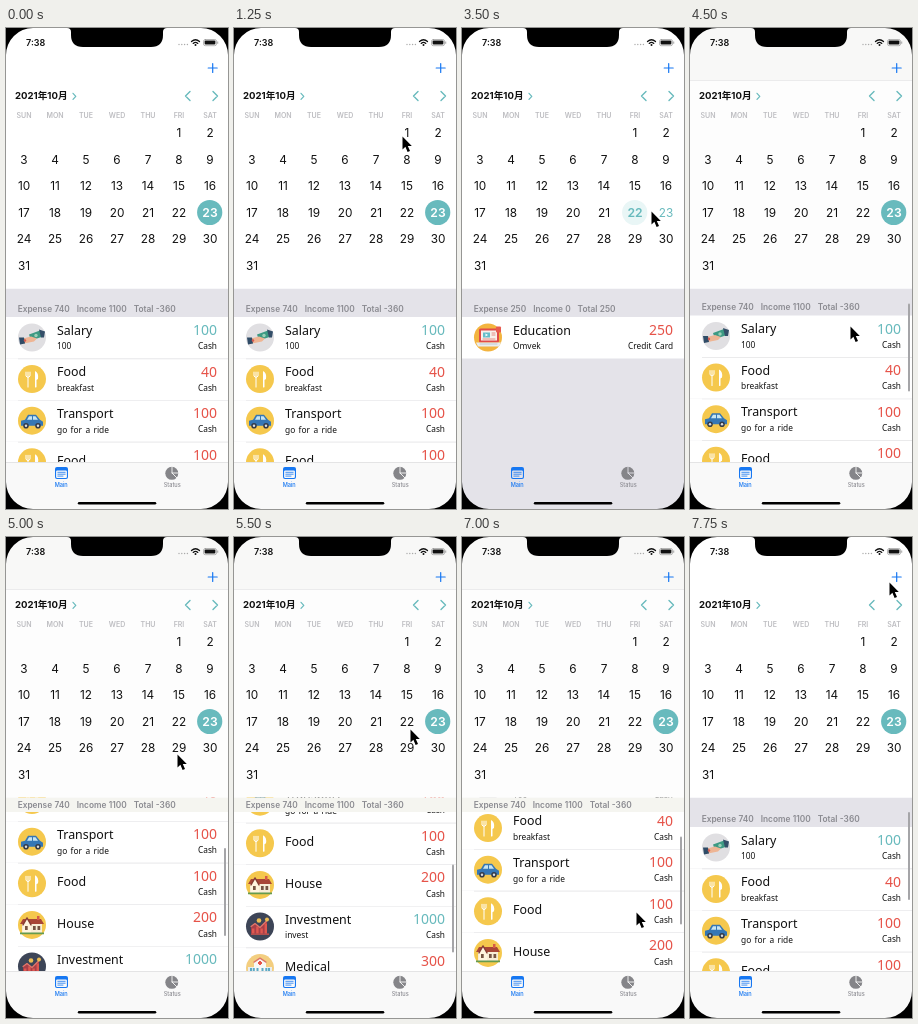
Animation, 222 px wide and 481 px high, one loop 8 s. Source, as an HTML page with a canvas:

```html
<!DOCTYPE html>
<html lang="en">
<head>
<meta charset="utf-8">
<title>Expense calendar</title>
<style>
  html, body { margin: 0; width: 100%; height: 100%; overflow: hidden; background: #fff; }
  canvas { display: block; width: 222px; height: 481px; }
</style>
</head>
<body>
<canvas id="stage"></canvas>
<script>
const W = 222, H = 481, LOOP = 8000, STEP = 250;
const UI = 'Inter, "Noto Sans CJK JP", "Noto Sans CJK", sans-serif';
const BODY = '"Noto Sans", sans-serif';
const TEAL = '#68babd', RED = '#e65349', BLUE = '#1677f2', GRAY = '#e4e3e9', MUTED = '#8b8b91';
const LIST_TOP = 260.5, ROWS_TOP = 289, ROW_H = 41.6, TAB_TOP = 434;

const canvas = document.getElementById('stage');
const ctx = canvas.getContext('2d');
const ratio = window.devicePixelRatio || 1;
canvas.width = W * ratio;
canvas.height = H * ratio;

function box(x, y, w, h, color, radius = 0) {
  ctx.fillStyle = color;
  ctx.beginPath();
  ctx.roundRect(x, y, w, h, radius);
  ctx.fill();
}
function disc(x, y, r, color) {
  ctx.fillStyle = color;
  ctx.beginPath();
  ctx.arc(x, y, r, 0, Math.PI * 2);
  ctx.fill();
}
function shape(path, color) {
  ctx.fillStyle = color;
  ctx.fill(new Path2D(path));
}
function stroke(path, color, width = 1) {
  ctx.strokeStyle = color;
  ctx.lineWidth = width;
  ctx.lineCap = ctx.lineJoin = 'round';
  ctx.stroke(new Path2D(path));
}
// y is the middle of the capital letters
function text(str, x, y, size, color, { weight = 400, font = UI, align = 'left', words = 0 } = {}) {
  ctx.font = `${weight} ${size}px ${font}`;
  ctx.textAlign = align;
  ctx.wordSpacing = words + 'px';
  ctx.fillStyle = color;
  ctx.fillText(str, x, y + size * 0.36);
}
function at(x, y, draw) {
  ctx.save();
  ctx.translate(x, y);
  draw();
  ctx.restore();
}

const icons = {
  salary() {
    disc(0, 0, 14, '#e0dfe2');
    shape('M-3 -3 L8 -7 L11 -1 L-1 3 Z', '#3d9a83');
    disc(4, -2, 1.7, '#9bd0b8');
    shape('M-9 1 L-1 -1 L5 1 L2 4 L-8 6 Z', '#eeb594');
    shape('M-13 0 L-8 0 L-7 6 L-12 7 Z', '#304c67');
    shape('M7 -8 L13 -6 L12 0 L9 0 Z', '#344f69');
    disc(-7, 3, 1.2, '#d65a50');
  },
  food() {
    disc(0, 0, 14, '#f5c84d');
    stroke('M-4 -1 V8 M-6 -7 V-3 Q-4 0 -2 -3 V-7 M-4 -7 V-2', '#fff', 1);
    shape('M3 -8 Q7 -6 6 0 L4.5 1 V8 Q3.5 9 3 8 Z', '#fff');
  },
  transport() {
    disc(0, 0, 14, '#f5c84d');
    shape('M-11 0 L-7 -1 L-4 -6 H4 L8 -1 L11 1 V5 H-11 Z', '#3577b5');
    shape('M-5 -1 L-3 -4.5 H0 V-1 Z M1 -1 V-4.5 H3.5 L6 -1 Z', '#c7e5f2');
    for (const x of [-6, 6]) { disc(x, 5, 2.8, '#343c4a'); disc(x, 5, 1.2, '#d9dde0'); }
  },
  house() {
    disc(0, 0, 14, '#f5c84d');
    box(-10, -2, 20, 10, '#f8edd6');
    shape('M-12 -1 L-9 -6 H9 L12 -1 Z', '#a94637');
    shape('M-9 0 L-5 -7 L-1 0 V8 H-9 Z', '#fff5df');
    stroke('M-9 0 L-5 -7 L-1 0', '#873e35', 1.4);
    box(5, -9, 2.5, 4, '#d65b48');
    for (const x of [-7, 1, 5.5]) box(x, 1, 2.7, 4, '#765544');
    box(-12, 7.5, 24, 1.8, '#659b4f');
  },
  investment() {
    disc(0, 0, 14, '#3d4557');
    shape('M-9 7 V0 L-5 -3 L0 1 L7 -6 V7 Z', '#a83f48');
    [5, 7, 5, 10].forEach((h, i) => box(-8 + i * 4.2, 7 - h, 2.4, h, '#df5850'));
    stroke('M-9 0 L-5 -3 L0 1 L7 -6', '#e3786a', 1.2);
    disc(-1, -6, 2.3, '#edbd54');
    disc(7, -7, 2, '#edbd54');
    box(-9, 7, 18, 1.3, '#d8534d');
  },
  medical() {
    disc(0, 0, 14, '#f3ce80');
    box(-12, -1, 24, 9, '#e9eef0');
    shape('M-6 -6 L0 -10 L6 -6 V8 H-6 Z', '#f7f7f5');
    stroke('M-6 -6 L0 -10 L6 -6', '#dc7568', 1.3);
    shape('M-1 -7 H1 V-6 H2 V-4 H1 V-3 H-1 V-4 H-2 V-6 H-1 Z', RED);
    for (const x of [-10, -7.2, -3.5, 1.5, 5.3, 8]) box(x, 0, 2, 3, '#5daac5');
    box(-12, 4.3, 24, 1.3, '#dd7468');
    box(-2, 4, 4, 5, '#4f91b0');
    box(-11.5, 7.8, 23, 1.8, '#65b5cb');
  },
  education() {
    disc(0, 0, 14, '#f3b43f');
    box(-9, -9, 20, 14, '#e24b48', 1.5);
    box(-7, -7, 16, 10, '#f8efeb');
    box(-5, -5, 7, 5, '#65bdca');
    shape('M-2.5 -4 L0 -2.5 L-2.5 -1 Z', '#fff');
    stroke('M4 -4.5 H7 M4 -2.5 H7 M-5 1.5 H7', '#df756e', 0.8);
    shape('M-12 5 H13 L11 9 H-10 Z', '#e9edf0');
    stroke('M-8 6.5 H9', '#b7c0c7', 0.8);
    box(8, -11, 5, 6, '#e75a4e', 1);
  }
};

const entry = (icon, title, note, amount, pay = 'Cash', color = RED) => ({ icon, title, note, amount, pay, color });
const days = {
  23: {
    summary: 'Expense 740   Income 1100   Total -360',
    rows: [
      entry('salary', 'Salary', '100', '100', 'Cash', TEAL),
      entry('food', 'Food', 'breakfast', '40'),
      entry('transport', 'Transport', 'go for a ride', '100'),
      entry('food', 'Food', '', '100'),
      entry('house', 'House', '', '200'),
      entry('investment', 'Investment', 'invest', '1000', 'Cash', TEAL),
      entry('medical', 'Medical', '', '300')
    ]
  },
  22: {
    summary: 'Expense 250   Income 0   Total 250',
    rows: [entry('education', 'Education', 'Omvek', '250', 'Credit Card')]
  }
};

// Each key: time, then values
const pointerKeys = [
  [1000, 184, 82], [1250, 168, 108], [1500, 152, 150], [1750, 162, 178], [2000, 170, 188],
  [2750, 171, 188], [3250, 184, 184], [3500, 189, 183], [4000, 189, 183], [4250, 172, 250],
  [4500, 160, 298], [4750, 164, 262], [5000, 171, 217], [5250, 175, 194], [5500, 176, 192],
  [5750, 168, 290], [6000, 166, 316], [6250, 165, 287], [6500, 166, 287], [6750, 170, 330],
  [7000, 174, 375], [7250, 184, 270], [7500, 196, 110], [7750, 199, 45]
];
const scrollKeys = [
  [4250, 0], [4500, 1.5], [4750, 38], [5000, 88], [5250, 122], [5500, 128], [5750, 128],
  [6000, 150], [6250, 178.3], [6500, 170], [6750, 125], [7000, 60], [7250, 8], [7500, -3], [7750, -1]
];
function sample(keys, t) {
  const next = keys.findIndex(k => k[0] > t);
  if (next === 0) return keys[0].slice(1);
  if (next < 0) return keys.at(-1).slice(1);
  const a = keys[next - 1], b = keys[next], p = (t - a[0]) / (b[0] - a[0]);
  return a.slice(1).map((v, i) => v + (b[i + 1] - v) * p);
}

function drawRow(row, y) {
  box(0, y, W, ROW_H, '#fff');
  at(26, y + 20.5, icons[row.icon]);
  const body = { font: BODY, words: 1.2 }, right = { ...body, align: 'right' };
  text(row.title, 51, y + (row.note ? 13.2 : 18.7), 12.4, '#111', body);
  text(row.note, 51, y + 29.3, 8.4, '#111', body);
  text(row.amount, 211, y + 13, 14, row.color, right);
  text(row.pay, 211, y + 29.3, 8.3, '#111', right);
}

function drawList(day, scroll) {
  const top = ROWS_TOP - scroll;
  ctx.save();
  ctx.beginPath();
  ctx.rect(0, LIST_TOP, W, H);
  ctx.clip();
  box(0, LIST_TOP, W, H, GRAY);
  day.rows.forEach((row, i) => {
    drawRow(row, top + i * ROW_H);
    if (i) box(12, top + i * ROW_H, W, 0.6, '#e4e4e6');
  });
  if (scroll > 13) box(0, LIST_TOP, W, 14.5, '#f5f5f0');
  text(day.summary, 11.7, Math.max(268.3, 281 - scroll), 8.3, MUTED, { weight: 600, words: 0.25 });
  ctx.restore();
  return top + day.rows.length * ROW_H;
}

function drawCalendar(selected) {
  text('2021年10月', 9, 68, 9.6, '#111', { weight: 700 });
  stroke('M67 65.3 L69.8 68.3 L67 71.3', TEAL, 1.2);
  stroke('M184 63.5 L179.5 68 L184 72.5 M207 63.5 L211.5 68 L207 72.5', TEAL, 1.4);
  'SUN MON TUE WED THU FRI SAT'.split(' ').forEach((name, i) =>
    text(name, 18 + i * 31, 87, 7, '#bdbdc1', { weight: 600, align: 'center' }));
  for (let day = 1; day <= 31; day++) {
    const cell = day + 4, x = 18 + cell % 7 * 31, y = 105 + Math.floor(cell / 7) * 26.5;
    const today = day === 23, active = day === selected;
    if (active) disc(x - 0.3, y, 12.6, today ? TEAL : '#e9f6f6');
    const color = active && today ? '#fff' : active || today ? TEAL : '#111';
    text(day, x, y, active ? 12.2 : 11.8, color, { weight: active ? 600 : 400, align: 'center' });
  }
}

function drawTabs(overContent) {
  const back = overContent ? '#f9f9f9' : GRAY;
  box(0, TAB_TOP, W, H - TAB_TOP, back);
  if (overContent) box(0, TAB_TOP, W, 0.6, '#cfcfd2');
  box(49, 439, 13, 12, BLUE, 2);
  box(50.1, 442.4, 10.8, 7.5, back, 1);
  stroke('M51.8 444.3 H59.2 M51.8 446.2 H59.2 M51.8 448.1 H57', BLUE, 0.8);
  disc(165.8, 445.3, 6.5, '#858589');
  stroke('M166 438.5 V445 L171 450 M166 445 H173', back, 0.9);
  text('Main', 55.2, 457.3, 5.6, BLUE, { weight: 500, align: 'center' });
  text('Status', 166.2, 457.3, 5.6, MUTED, { weight: 500, align: 'center' });
  box(71.8, 473.9, 78.5, 2.7, '#000', 1.4);
}

function drawPhone() {
  text('7:38', 20, 14.7, 9, '#111', { weight: 600 });
  for (let i = 0; i < 4; i++) disc(173 + i * 2.8, 16.5, 0.7, '#aaa');
  stroke('M185.5 13.5 Q189.5 10 193.5 13.5 M187.2 15.4 Q189.5 13.4 191.8 15.4', '#111', 1.3);
  disc(189.5, 17, 1, '#111');
  ctx.strokeStyle = '#999';
  ctx.lineWidth = 0.7;
  ctx.beginPath();
  ctx.roundRect(197.5, 11.5, 13, 6.2, 1.8);
  ctx.stroke();
  box(198.6, 12.6, 10.8, 4, '#111', 1);
  box(211.3, 13.5, 0.9, 2.2, '#999');
  shape('M61 0 Q65 0 65 4 V7 Q65 19 77 19 H145 Q157 19 157 7 V4 Q157 0 161 0 Z', '#000');
  ctx.fillStyle = '#000';
  ctx.beginPath();
  ctx.rect(0, 0, W, H);
  ctx.roundRect(0, 0, W, H, 27);
  ctx.fill('evenodd');
}

function drawPointer(x, y) {
  const arrow = 'M0.5 0.5 V13.5 L3.4 10.8 L5.6 16 L8 15 L5.8 9.9 H9.8 Z';
  at(x, y, () => {
    stroke(arrow, '#fff', 1.6);
    shape(arrow, '#000');
  });
}

function render(t) {
  const [scroll] = sample(scrollKeys, t);
  const selected = t >= 2500 && t < 3750 ? 22 : 23;
  ctx.setTransform(ratio, 0, 0, ratio, 0, 0);
  box(0, 0, W, H, scroll > 0 ? '#fdfdfd' : '#fff');
  if (scroll > 0) {
    box(0, 0, W, 52, '#f8f8f7');
    box(0, 52, W, 0.6, '#d9d9db');
  }
  stroke('M202.2 40 H211.2 M206.7 35.5 V44.5', BLUE, 1.2);
  drawCalendar(selected);
  const listEnd = drawList(days[selected], scroll);
  if (t >= 4500) {
    const top = 275 + Math.max(0, scroll) * 0.41;
    box(218, top, 2, Math.min(88, 432 - top), '#a5a5a8', 1);
  }
  drawTabs(listEnd > TAB_TOP);
  drawPhone();
  if (t >= 1000) drawPointer(...sample(pointerKeys, t));
}

function tick() {
  render(Math.floor(performance.now() % LOOP / STEP) * STEP);
  requestAnimationFrame(tick);
}
tick();
</script>
</body>
</html>
```
